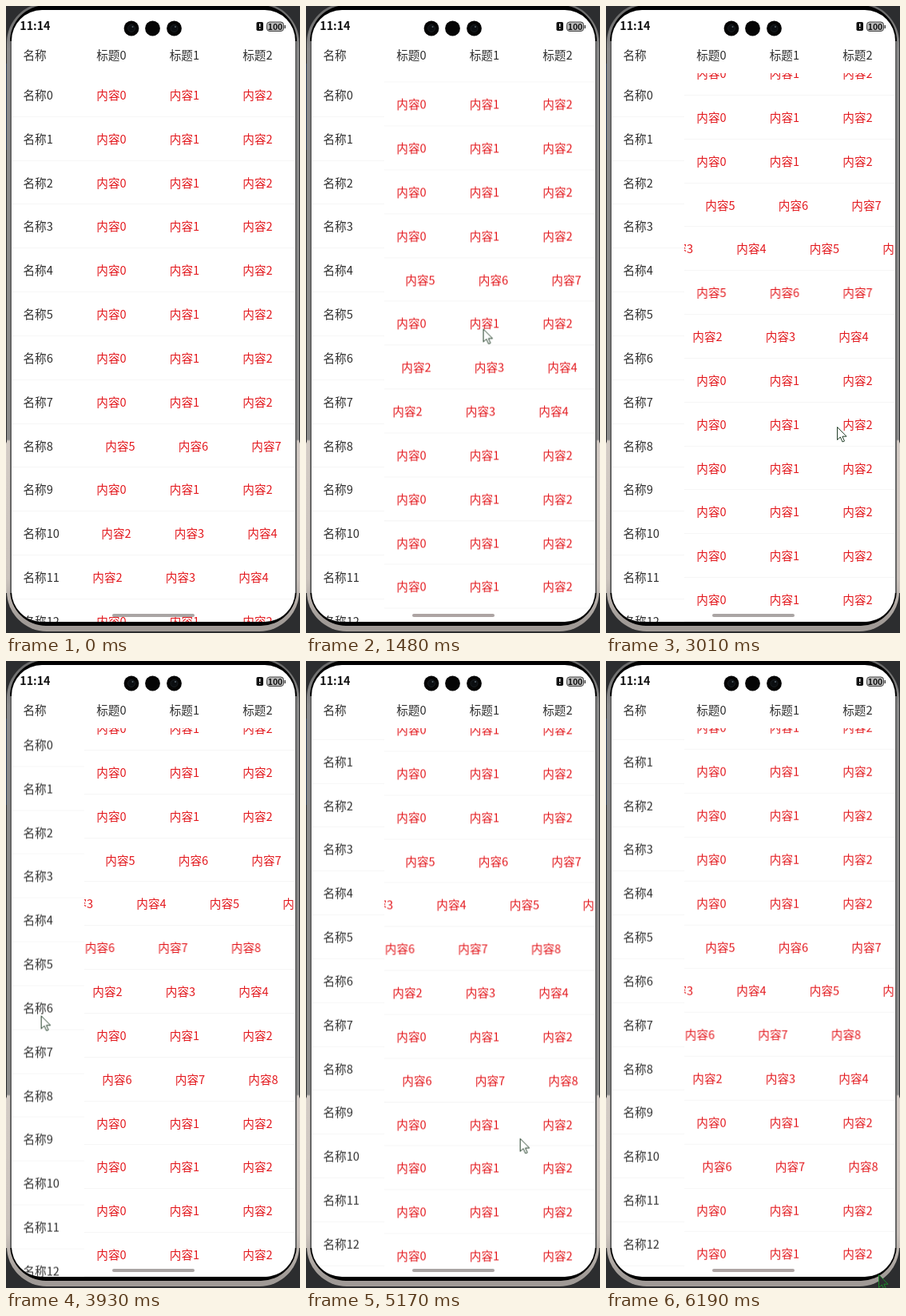
An HTML page that plays this animation: 368 px wide and 784 px high, repeating every 6570 ms.

```html
<!DOCTYPE html>
<html lang="zh-CN">
<head>
<meta charset="utf-8">
<title>滚动表格</title>
<style>
  :root { --row: 54.83px; --loop: 6570ms linear infinite; }
  html, body { margin: 0; width: 100%; height: 100%; overflow: hidden; background: #2c2d2f; }
  #stage {
    position: relative; width: 368px; height: 784px; overflow: hidden; background: #2c2d2f;
    font: 14.6px "Noto Sans CJK SC", "Noto Sans CJK", "Noto Sans", sans-serif; color: #2d2d2d;
  }
  #stage div, #stage svg, #stage span { position: absolute; white-space: nowrap; }

  /* phone body */
  .glow { left: 0; top: 72px; width: 2px; height: 108px; background: #2b3a55; }
  .rim {
    left: 1px; top: -4px; width: 366px; height: 786px; border-radius: 50px;
    background: linear-gradient(#666 0, #8b8b8b 60px, #8b8b8b 546px, #d2cac4 548px, #cac2bc 720px, #a09a96 775px);
  }
  .ledge {
    left: 0; top: 544px; width: 368px; height: 190px; border-radius: 4px 4px 0 0;
    background: linear-gradient(#d8d0ca, #c8c0ba);
  }
  .edge { left: 5px; top: -1px; width: 359px; height: 776px; border-radius: 45px; background: #000; }
  .side { left: 5px; top: 44px; width: 359px; height: 690px; background: #666; }
  .screen { left: 7px; top: 5px; width: 355px; height: 765px; border-radius: 38px; overflow: hidden; background: #fff; }

  /* table */
  #head { top: 34px; line-height: 44px; height: 44px; }
  .pane { top: 79px; height: 686px; overflow: hidden; }
  #names { left: 0; width: 91px; }
  #cells { left: 91px; width: 264px; color: #e3191e; }
  .list { left: 0; top: 0; width: 100%; }
  .row { left: 0; width: 100%; height: var(--row); line-height: 53px; overflow: hidden; }
  .row::after { content: ""; position: absolute; left: 0; right: 0; bottom: 0; height: 1px; background: #f6f6f6; }
  #names span { left: 14.5px; }
  .strip { left: 15.3px; top: 0; }

  .bar { left: 126px; top: 755px; width: 103px; height: 4px; border-radius: 2px; background: #aaa5a4; animation: bar var(--loop); }
  #cursor { left: 0; top: 0; overflow: visible; animation: move var(--loop), tint 6570ms step-end infinite; }

  #cells .list { animation: cells var(--loop); }
  #names .list { animation: names var(--loop); }
  .drag9 { animation: drag9 var(--loop); }
  .drag10 { animation: drag10 var(--loop); }
  .drag13 { animation: drag13 var(--loop); }

  @keyframes cells {
    0%, 7% { transform: translateY(0); }
    14.1%, 15.1% { transform: translateY(-112.2px); }
    17.6%, 21.2% { transform: translateY(-165px); animation-timing-function: ease-out; }
    27.8%, 78.5% { transform: translateY(-301px); }
    84.4%, 85.4% { transform: translateY(-261px); animation-timing-function: ease-out; }
    94.2%, 100% { transform: translateY(-192.3px); }
  }
  @keyframes names {
    0%, 57% { transform: translateY(0); }
    60.9% { transform: translateY(-9px); animation-timing-function: ease-out; }
    70.5%, 100% { transform: translateY(-40.3px); }
  }
  @keyframes drag9 {
    0%, 29.3% { transform: translateX(0); animation-timing-function: ease-out; }
    38.5%, 100% { transform: translateX(-316px); }
  }
  @keyframes drag10 {
    0%, 37.3% { transform: translateX(-177px); }
    45.8%, 46.8% { transform: translateX(-457.5px); animation-timing-function: ease-out; }
    52%, 100% { transform: translateX(-563.5px); }
  }
  @keyframes drag13 {
    0%, 46.8% { transform: translateX(0); animation-timing-function: ease-out; }
    58%, 100% { transform: translateX(-542px); }
  }
  @keyframes bar {
    0%, 8% { background: #aaa5a4; }
    13%, 19% { background: #c09f99; }
    23%, 80% { background: #aaa5a4; }
    84%, 87% { background: #bca6a3; }
    93%, 100% { background: #aea5a4; }
  }
  @keyframes move {
    0%, 1.2% { transform: translate(260px, 671px); }
    3.5%, 6.5% { transform: translate(213px, 469px); }
    14.1%, 15.1% { transform: translate(253px, 242px); }
    17.6%, 19.5% { transform: translate(235px, 215px); }
    21.5% { transform: translate(230px, 430px); }
    27% { transform: translate(185px, 290px); }
    28.3%, 29.3% { transform: translate(171px, 295px); }
    32.7% { transform: translate(100px, 300px); }
    37.3% { transform: translate(300px, 360px); }
    42.6% { transform: translate(86px, 362px); }
    45.8%, 46.8% { transform: translate(289px, 526px); }
    50.2% { transform: translate(110px, 528px); }
    56.3% { transform: translate(45px, 480px); }
    64%, 68.5% { transform: translate(42px, 400px); }
    73.8%, 74.9% { transform: translate(236px, 359px); }
    79% { transform: translate(270px, 615px); }
    84.4%, 85.4% { transform: translate(287px, 668px); }
    94.2%, 100% { transform: translate(341px, 767px); }
  }
  @keyframes tint {
    0% { opacity: 0; fill: #fff; stroke: #24402a; }
    1.06% { opacity: 1; fill: #fff; stroke: #24402a; }
    93.6%, 100% { opacity: 1; fill: #2c2d2f; stroke: #1f8a2c; }
  }
</style>
</head>
<body>
<div id="stage">
  <div class="glow"></div>
  <div class="ledge"></div>
  <div class="rim"></div>
  <div class="edge"></div>
  <div class="side"></div>
  <div class="screen">
    <div id="head"></div>
    <div class="pane" id="names"><div class="list"></div></div>
    <div class="pane" id="cells"><div class="list"></div></div>
    <div class="bar"></div>
  </div>
  <svg width="368" height="50" style="left:0;top:0">
    <text x="17.3" y="30.2" font-size="14.2" font-weight="700" fill="#111">11:14</text>
    <g id="lenses"></g>
    <rect x="313.5" y="20" width="8.5" height="11" rx="1.8" fill="#111"/>
    <path d="M317.7 22v4M317.7 27.5v1.6" stroke="#fff" stroke-width="1.4"/>
    <rect x="326.5" y="20" width="21" height="11.5" rx="3.5" fill="#bbb" stroke="#444"/>
    <path d="M349.3 24v4" stroke="#444" stroke-width="1.4"/>
    <text x="337" y="29.7" text-anchor="middle" font-size="10.5" font-weight="700" fill="#111">100</text>
  </svg>
  <svg id="cursor" width="13" height="20"><path d="M.5 .5V16.5L4.3 13L7 19L9.5 18L6.9 12.2H12Z"/></svg>
</div>
<script>
  const ROW = 54.83, COL = 91.5;
  const $ = s => document.querySelector(s);
  const span = (text, x = null) => `<span${x === null ? '' : ` style="left:${x}px"`}>${text}</span>`;
  const repeat = (n, fn) => Array.from({ length: n }, (_, i) => fn(i)).join('');
  const row = (i, body) => `<div class="row" style="top:${i * ROW}px">${body}</div>`;

  // resting horizontal offsets of rows that start scrolled
  const offsets = { 8: 446.5, 10: 177, 11: 188 };

  $('#head').innerHTML = span('名称', 14.5) + repeat(3, k => span('标题' + k, 106.2 + k * COL));

  $('#names .list').innerHTML = repeat(16, i => row(i, span('名称' + i)));
  $('#cells .list').innerHTML = repeat(20, i => row(i,
    `<div class="strip drag${i}" style="transform:translateX(${-(offsets[i] || 0)}px)">` +
    repeat(10, k => span('内容' + k, k * COL)) + '</div>'));

  $('#lenses').innerHTML = [157, 183.5, 210.5].map((x, i) =>
    `<circle cx="${x}" cy="28" r="9.4" fill="#050505"/>` +
    (i === 1 ? '' : `<circle cx="${x}" cy="28" r="4.5" fill="#0b0e11" stroke="#1b1f22"/>
      <circle cx="${x + 1.5}" cy="26" r="1" fill="#59636b"/>`)).join('');
</script>
</body>
</html>
```
